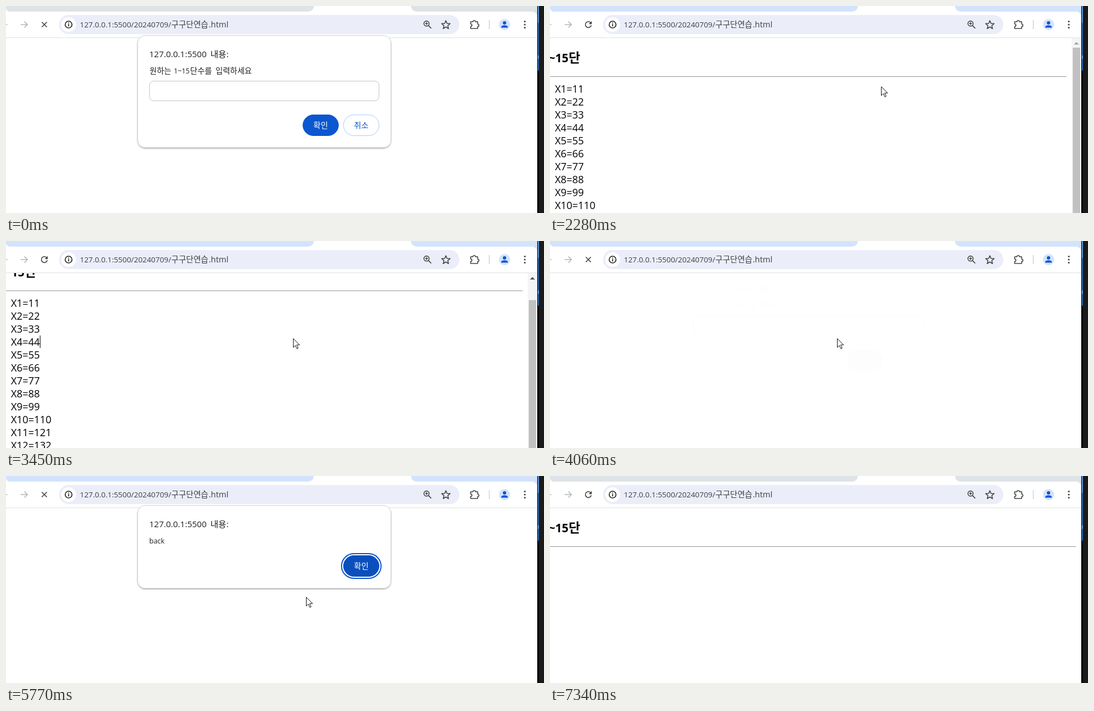
An HTML page for the animation above (7.4 s loop, 954 px wide and 368 px high).

```html
<!DOCTYPE html>
<html lang="ko">
<head>
<meta charset="utf-8">
<title>구구단 연습</title>
<style>
html, body { margin: 0; width: 100%; height: 100%; overflow: hidden; background: #fff; }
svg { display: block; width: 954px; height: 368px; }
text { font-family: 'Open Sans', 'Noto Sans CJK KR', 'Noto Sans CJK', 'Noto Sans', sans-serif; white-space: pre; }
.line { fill: none; stroke: #444746; stroke-width: 1.6; stroke-linejoin: round; }
.pale { stroke: #b4b6b8; }
</style>
</head>
<body>
<svg id="stage" viewBox="0 0 954 368"></svg>
<script>
const LOOP = 7400;
const BLUE = '#0b57d0';
const stage = document.getElementById('stage');

// runs: [x, size, string] pieces that share one baseline
const label = (y, runs, attrs = '') => runs.map(([x, size, str]) =>
  `<text x="${x}" y="${y}" font-size="${size}" ${attrs}>${str}</text>`).join('');

const pill = (x, y, fill, stroke, ink, str) =>
  `<rect x="${x + .5}" y="${y + .5}" width="63" height="37" rx="18.5" fill="${fill}" stroke="${stroke}"/>` +
  label(y + 24, [[x + 32, 14, str]], `fill="${ink}" text-anchor="middle"`);

const panel = height =>
  `<rect x="233.5" y="52.5" width="449" height="${height}" rx="13" fill="#fff" stroke="#cfd1d3" filter="url(#shade)"/>` +
  label(91, [[254, 15, '127.0.0.1:5500'], [362.5, 15.3, '내용:']], 'fill="#1f1f1f"');

const tableRows = Array.from({ length: 15 }, (_, i) =>
  label(154 + i * 23, [[8.7, 17.9, `X${i + 1}=${11 * (i + 1)}`]])).join('');

stage.innerHTML = `
<defs>
  <filter id="shade" x="-5%" y="-5%" width="110%" height="115%">
    <feDropShadow dx="0" dy="1.5" stdDeviation="1.3" flood-color="#000" flood-opacity=".3"/>
  </filter>
</defs>
<rect width="954" height="368" fill="#fff"/>

<g id="page">
  <g id="content">
    ${label(100, [[-2.5, 20.5, '~15'], [33, 22.5, '단']], 'font-weight="700"')}
    <path id="rule" stroke="#979797"/>
    <g id="rows">${tableRows}</g>
    <path id="pageCaret" d="M60.5 205v22" stroke="#000"/>
  </g>
  <g id="scrollbar">
    <rect x="925" y="57" width="17" height="311" fill="#f5f5f5"/>
    <rect id="thumb" x="927" width="13" height="340" fill="#c1c1c1"/>
    <path id="upArrow" d="M929 68.5l4.5-4.5 4.5 4.5z"/>
  </g>
</g>

<rect width="943" height="56" fill="#fff"/>
<path d="M0 56.5H942" stroke="#dfe1e4"/>
<path id="tabs" d="M0 0H546A10 10 0 0 1 536 10H8A8 8 0 0 1 0 4zM718 0H943V19H942A9 9 0 0 0 933 10H728A10 10 0 0 1 718 0z"/>
<path class="line pale" d="M-8 33H2.5M26 33h11.5M32.5 27.5l5.5 5.5-5.5 5.5"/>
<path id="stop" class="line" d="M63.5 28.5l9 9M72.5 28.5l-9 9"/>
<g id="reload">
  <path class="line" d="M72.4 30A5.3 5.3 0 1 0 73.2 34.2"/>
  <path d="M74 26.8v5.4h-5.4z" fill="#444746"/>
</g>
<rect x="94" y="16" width="710" height="34" rx="17" fill="#ebeef9"/>
<circle cx="111" cy="33" r="13" fill="#fff"/>
<circle cx="111" cy="33" r="6" class="line" style="stroke:#1f1f1f"/>
<path d="M111 32v4.2M111 29.4v1.6" stroke="#1f1f1f" stroke-width="1.6"/>
${label(38, [[131, 13.4, '127.0.0.1:5500/20240709/'], [293, 14.3, '구구단연습'], [359.5, 14.4, '.html']], 'fill="#3c3f43"')}
<g class="line">
  <circle cx="745.7" cy="31.2" r="4.6"/>
  <path d="M749 34.6l5 5M743.3 31.2h4.8M745.7 28.8v4.8"/>
  <path d="M780 26l2.1 5 5.4.4-4.1 3.5 1.3 5.3-4.7-2.9-4.7 2.9 1.3-5.3-4.1-3.5 5.4-.4z"/>
  <path d="M824 28h4a2.1 2.1 0 0 1 4.4 0h4v4.2a2.1 2.1 0 0 1 0 4.4v3.4h-12.4v-3.6a2.1 2.1 0 0 0 0-4.4z"/>
</g>
<path d="M857 25v16" stroke="#cfe0fb" stroke-width="2"/>
<circle cx="884" cy="33" r="10" fill="#d3e3fd"/>
<circle cx="884" cy="30" r="3" fill="${BLUE}"/>
<path d="M878 38.5v-1.2q1-3 6-3t6 3v1.2z" fill="${BLUE}"/>
${[27.5, 33, 38.5].map(y => `<circle cx="920" cy="${y}" r="1.6" fill="#444746"/>`).join('')}

<rect x="942" width="3" height="368" fill="#050505"/>
<rect x="945" width="9" height="368" fill="#1a1a1a"/>
<rect x="943" width="2" height="115" fill="#2a66b0"/>
<rect x="943" width="2" height="30" fill="#5f9bdc"/>
<rect x="943" y="88" width="2" height="6" fill="#6fa2d6"/>

<g id="prompt">
  ${panel(199)}
  ${label(119.5, [[254.5, 14, '원하는'], [297.5, 12.3, '1~15'], [326.5, 14, '단수를'], [371.5, 14, '입력하세요']], 'fill="#1f1f1f"')}
  <rect id="field" fill="#fff"/>
  <text id="typed" x="264" y="155.5" fill="#1f1f1f"></text>
  <path id="underline" stroke="#1f1f1f"/>
  <path id="caret" stroke="#000"/>
  ${pill(526, 193, BLUE, BLUE, '#fff', '확인')}
  ${pill(598, 193, '#fff', '#a8cdf5', BLUE, '취소')}
</g>

<g id="alert">
  ${panel(147)}
  ${label(119.5, [[254, 12.5, 'back']], 'fill="#1f1f1f"')}
  <rect x="595" y="138" width="70" height="44" rx="22" fill="#fff" stroke="${BLUE}" stroke-width="2"/>
  ${pill(598, 141, '#0b4fbd', '#0b4fbd', '#fff', '확인')}
</g>

<path id="arrow" d="M.5 .5V16.2L4.1 12.8L6.8 18.6L9.1 17.6L6.5 11.8H11.6z" fill="#fff" stroke="#111"/>
<path id="beam" d="M-3 -7.5H-1L.5 -6.5L2 -7.5H4M.5 -6.5V6.5M-3 7.5H-1L.5 6.5L2 7.5H4" fill="none" stroke="#111"/>`;

const el = Object.fromEntries([...stage.querySelectorAll('[id]')].map(n => [n.id, n]));
const set = (node, attrs) => { for (const k in attrs) node.setAttribute(k, attrs[k]); };
const show = (node, on) => { node.style.display = on ? '' : 'none'; };
const within = (t, a, b) => t >= a && t < b;
const ramp = (t, a, b) => Math.min(1, Math.max(0, (t - a) / (b - a)));
const ease = p => p * p * (3 - 2 * p);

// time, x, y of the pointer tip
const path = [
  [70, 640, 321], [400, 516, 152], [2210, 516, 152], [2280, 587, 143],
  [2420, 592, 150], [2840, 526, 180], [2980, 513, 179], [3380, 513, 179],
  [3450, 509, 173], [5140, 509, 173], [5350, 528, 216], [5490, 528, 216],
  [5560, 532, 215], [5970, 532, 215], [6320, 640, 160], [6530, 640, 160],
  [6670, 671, 172], [6720, 671, 172], [7010, 954, 368]
];

function pointerAt(t) {
  const i = path.findIndex(k => k[0] > t);
  if (i < 1) return null;
  const [t0, x0, y0] = path[i - 1], [t1, x1, y1] = path[i];
  const p = ramp(t, t0, t1);
  return [Math.round(x0 + (x1 - x0) * p), Math.round(y0 + (y1 - y0) * p)];
}

// time, text, shown from that moment on
const typing = [
  [0, ''], [1140, '1'], [1280, '11'], [3850, ''],
  [4810, 'ㅁ'], [4950, 'ㅁㄴ'], [5070, 'ㅁㄴㅇ'], [5210, 'ㅁㄴㅇㄹ']
];
const valueAt = t => typing.filter(k => k[0] <= t).pop()[1];

function drawPrompt(t) {
  const second = t > 3850;
  const alpha = second
    ? ramp(t, 4060, 4270) * (1 - ramp(t, 5550, 5650))
    : 1 - ramp(t, 1470, 1640);
  show(el.prompt, alpha > 0);
  el.prompt.style.opacity = alpha;

  const focused = t >= 460;
  set(el.field, focused
    ? { x: 254, y: 133, width: 408, height: 36, rx: 8, stroke: BLUE, 'stroke-width': 2 }
    : { x: 254.5, y: 133.5, width: 407, height: 35, rx: 7.5, stroke: '#c2c4c7', 'stroke-width': 1 });

  const value = valueAt(t);
  const step = second ? 12 : 7.15;
  const end = Math.round(264 + value.length * step);
  el.typed.textContent = value;
  set(el.typed, { 'font-size': second ? 13 : 12.5 });
  set(el.caret, { d: `M${end + .5} 141v16` });
  show(el.caret, focused && !within(t, 990, 1140) && t < 5490);
  set(el.underline, { d: `M${end - 12} 157.5h12` });
  show(el.underline, second && value && t < 5490);
  return alpha > 0;
}

function drawPage(t) {
  const table = within(t, 1550, 3990);
  const last = t >= 6450;
  show(el.page, table || last);
  show(el.rows, table);
  show(el.scrollbar, table);
  show(el.pageCaret, within(t, 3110, 3650));
  const scroll = table ? Math.round(37 * ease(ramp(t, 2560, 2980))) : 0;
  set(el.content, { transform: `translate(0 ${-scroll})` });
  set(el.rule, { d: `M0 125.5H${table ? 916 : 933}` });
  set(el.thumb, { y: 74 + Math.round(scroll * .84) });
  set(el.upArrow, { fill: scroll ? '#505050' : '#a3a3a3' });
}

function drawPointer(t, prompting) {
  const pos = pointerAt(t);
  const inField = pos && prompting && within(pos[0], 254, 662) && within(pos[1], 133, 169);
  show(el.arrow, pos && !inField);
  show(el.beam, inField);
  if (pos) set(inField ? el.beam : el.arrow, { transform: `translate(${pos})` });
}

function draw(t) {
  set(el.tabs, { fill: within(t, 460, 7340) ? '#d3e3fd' : '#dee3e8' });
  const loading = t < 1550 || within(t, 3850, 6450);
  show(el.stop, loading);
  show(el.reload, !loading);
  drawPage(t);
  const prompting = drawPrompt(t);
  const alpha = ramp(t, 5590, 5760) * (1 - ramp(t, 6390, 6560));
  show(el.alert, alpha > 0);
  el.alert.style.opacity = alpha;
  drawPointer(t, prompting);
}

const start = performance.now();
function tick() {
  draw((performance.now() - start) % LOOP);
  requestAnimationFrame(tick);
}
tick();
</script>
</body>
</html>
```
